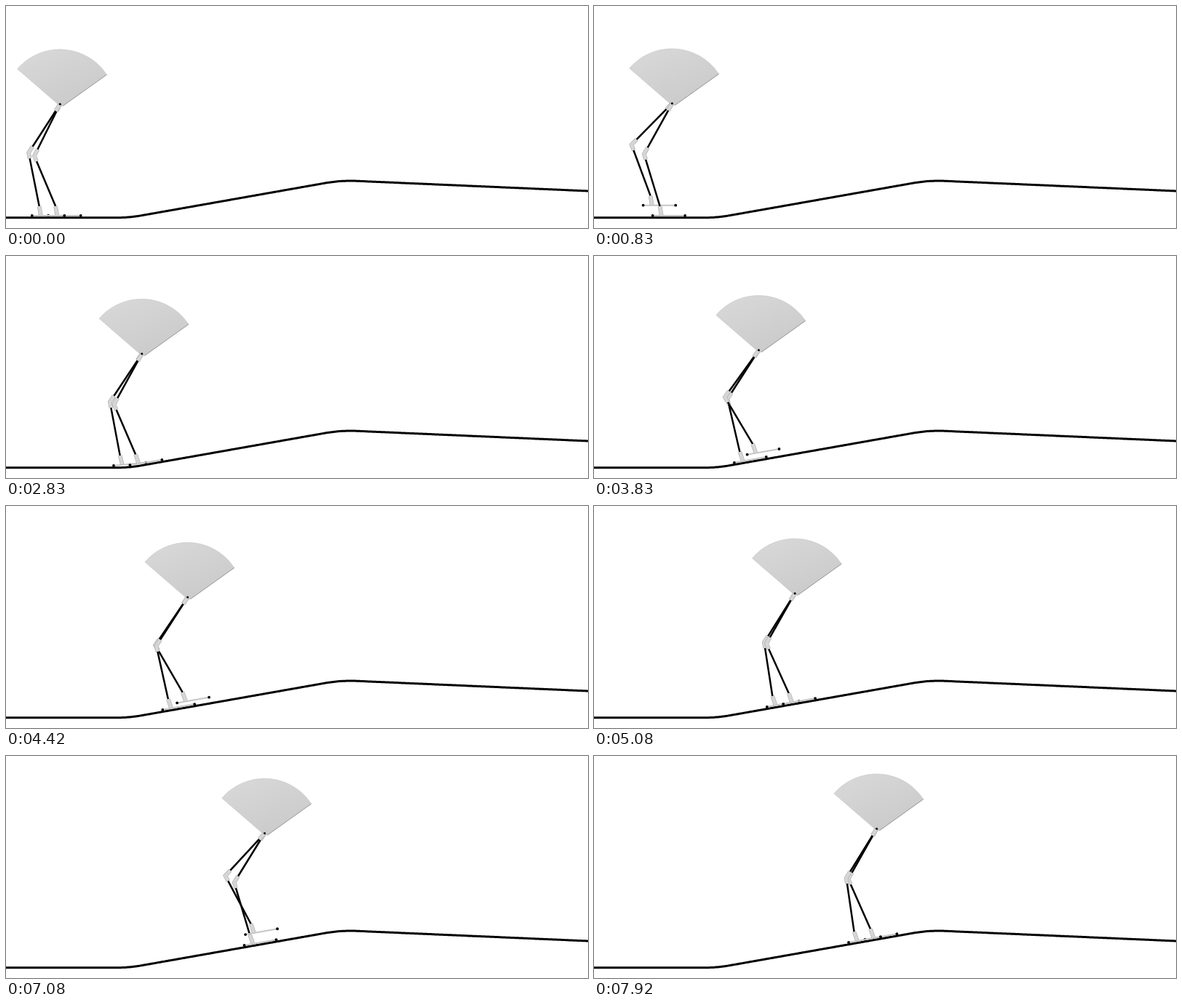
Animation of 800 by 306 pixels, one loop 8 s. Source, as an HTML page with a canvas:

```html
<!DOCTYPE html>
<html lang="en">
<head>
<meta charset="utf-8">
<title>Walker</title>
<style>
  html, body { margin: 0; width: 100%; height: 100%; overflow: hidden; background: #fff; }
  canvas { display: block; width: 800px; height: 306px; }
</style>
</head>
<body>
<canvas id="stage"></canvas>
<script>
const W = 800, H = 306, LOOP = 8000, FPS = 12;
const STEP_TIME = 560, STEP = 22.45, FIRST_HEEL = 35.7, HIP_SPEED = 0.0397;
const THIGH = 79.7, SHIN = 75.2, FOOT = 44.6, SOLE = 2.8;
const SWING_START = 0.265, LIFT = 15.3;

const canvas = document.getElementById('stage');
const ctx = canvas.getContext('2d');
const scale = window.devicePixelRatio || 1;
canvas.width = W * scale;
canvas.height = H * scale;
ctx.scale(scale, scale);

const mix = (a, b, p) => a + (b - a) * p;
const along = (a, b, d) => {
  const len = Math.hypot(b.x - a.x, b.y - a.y);
  return { x: mix(a.x, b.x, d / len), y: mix(a.y, b.y, d / len) };
};

// A ramp with a rounded start of half-width w
const bend = (d, w) => d < -w ? 0 : d > w ? d : (d + w) ** 2 / (4 * w);
const ground = x => 291.8 - 0.177 * bend(x - 169, 18) + 0.2205 * bend(x - 460.3, 22);

function stroke(points, color, width) {
  ctx.beginPath();
  points.forEach(p => ctx.lineTo(p.x, p.y));
  ctx.strokeStyle = color;
  ctx.lineWidth = width;
  ctx.lineJoin = 'miter';
  ctx.stroke();
}

function dot(p, r) {
  ctx.beginPath();
  ctx.arc(p.x, p.y, r, 0, Math.PI * 2);
  ctx.fillStyle = '#000';
  ctx.fill();
}

function sleeve(points, width = 5.6) {
  stroke(points, '#aaa', width);
  stroke(points, '#d6d6d6', width - 1.2);
}

function foothold(n) {
  const x = FIRST_HEEL + n * STEP;
  const y = ground(x) - SOLE;
  return { x, y, angle: Math.atan2(ground(x + FOOT) - SOLE - y, FOOT) };
}

function swingFoot(k, u) {
  const from = foothold(k), to = foothold(k + 2);
  const w = Math.max(0, (u - SWING_START) / (1 - SWING_START));
  const p = (1 - Math.cos(Math.PI * w)) / 2;
  return {
    x: mix(from.x, to.x, p),
    y: mix(from.y, to.y, p) - LIFT * Math.sin(Math.PI * w ** 0.8),
    angle: mix(from.angle, to.angle, p)
  };
}

// Two-bone solve with the knee pointing backwards
function kneeOf(hip, ankle) {
  const dx = ankle.x - hip.x, dy = ankle.y - hip.y;
  const d = Math.hypot(dx, dy);
  const a = (THIGH ** 2 - SHIN ** 2 + d * d) / (2 * d);
  const h = Math.sqrt(Math.max(0, THIGH ** 2 - a * a));
  return { x: hip.x + (dx * a - dy * h) / d, y: hip.y + (dy * a + dx * h) / d };
}

function drawLeg(hip, foot) {
  const c = Math.cos(foot.angle), s = Math.sin(foot.angle);
  const onFoot = (x, y) => ({ x: foot.x + x * c - y * s, y: foot.y + x * s + y * c });
  const heel = onFoot(0, 0), toe = onFoot(FOOT, 0);
  const ankle = onFoot(10, -13), base = onFoot(12, -0.5);
  const knee = kneeOf(hip, ankle);

  stroke([heel, toe], '#c6c6c6', 2);
  dot(heel, 1.9);
  dot(toe, 1.9);

  stroke([along(hip, knee, 8), along(knee, hip, 8)], '#000', 2.5);
  stroke([along(knee, ankle, 6), ankle], '#000', 2.5);
  sleeve([along(knee, hip, 10), knee, along(knee, ankle, 8)]);
  sleeve([ankle, base]);
  sleeve([hip, along(hip, knee, 11)]);
}

function drawFan(hip) {
  const cx = hip.x - 0.2, cy = hip.y + 1.6, r = 77;
  const left = Math.atan2(-50, -58.5), right = Math.atan2(-42, 64);
  const shade = ctx.createLinearGradient(cx - 20, cy - r, cx + 12, cy);
  shade.addColorStop(0, '#d7d7d7');
  shade.addColorStop(1, '#cbcbcb');
  ctx.beginPath();
  ctx.moveTo(cx - 1, cy);
  ctx.arc(cx, cy, r, left, right);
  ctx.lineTo(cx + 4, cy + 1);
  ctx.closePath();
  ctx.fillStyle = shade;
  ctx.fill();
  ctx.strokeStyle = '#c4c4c4';
  ctx.lineWidth = 0.6;
  ctx.stroke();
  const tip = { x: cx + r * Math.cos(right), y: cy + r * Math.sin(right) };
  stroke([{ x: cx + 4, y: cy + 1 }, tip], '#999', 1);
}

function drawGround() {
  const points = [];
  for (let x = -4; x <= W + 4; x += 2) points.push({ x, y: ground(x) });
  stroke(points, '#000', 3);
}

function draw(t) {
  const k = Math.floor(t / STEP_TIME), u = t / STEP_TIME - k;
  const x = 74.3 + t * HIP_SPEED;
  const bob = 0.8 * Math.cos(2 * Math.PI * (u - 0.85));
  const hip = { x, y: ground(x - 25) - 157 + bob };

  const planted = foothold(k + 1), moving = swingFoot(k, u);
  const [near, far] = k % 2 ? [planted, moving] : [moving, planted];

  ctx.fillStyle = '#fff';
  ctx.fillRect(0, 0, W, H);
  drawGround();
  drawFan(hip);
  drawLeg(hip, far);
  drawLeg(hip, near);
  dot(hip, 1.5);
}

function tick(now) {
  const frame = Math.floor((now % LOOP) * FPS / 1000 + 0.05);
  draw(frame * 1000 / FPS % LOOP);
  requestAnimationFrame(tick);
}

draw(0);
requestAnimationFrame(tick);
</script>
</body>
</html>
```
